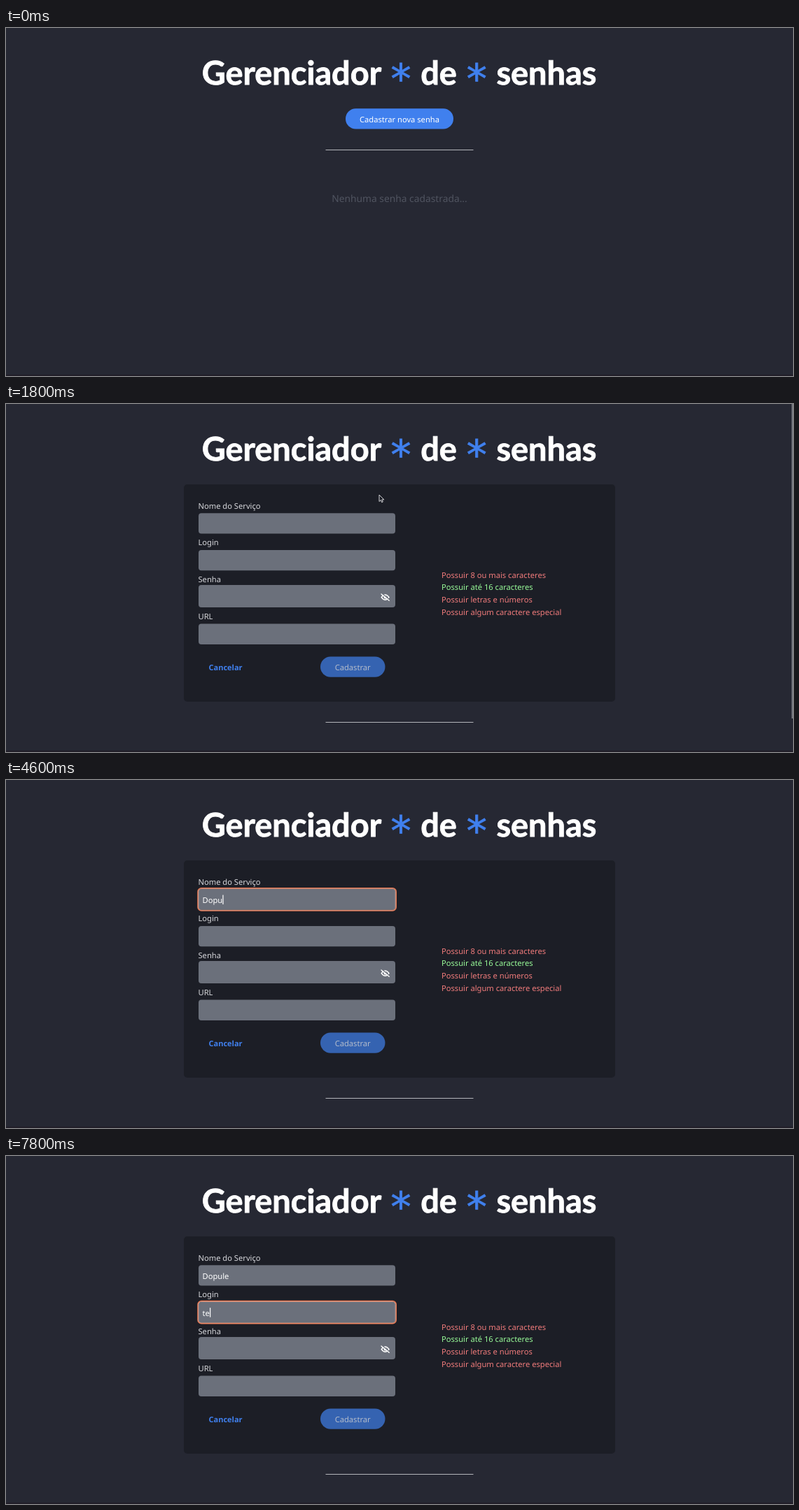
Write an HTML page that moves like this. It is 1124x498 px and loops after 8000 ms.

```html
<!DOCTYPE html>
<html lang="pt-BR">
<head>
<meta charset="utf-8">
<title>Gerenciador de senhas</title>
<style>
  html, body { margin: 0; width: 100%; height: 100%; overflow: hidden; background: #262833; }
  svg { display: block; width: 1124px; height: 498px; }
  text { font: 11.17px "Noto Sans", "Open Sans", sans-serif; fill: #d6d7db; text-rendering: geometricPrecision; white-space: pre; }
  .title text { font: 700 46.9px Lato, sans-serif; fill: #fff; stroke: #fff; stroke-width: .9; }
  .title .star { font: 400 58px "DejaVu Sans", sans-serif; fill: #4080ee; stroke: #4080ee; text-anchor: middle; }
  .mid { text-anchor: middle; }
  .field { fill: #6b707b; }
  .bad text { fill: #f07b7b; }
  .bad .ok { fill: #98fb98; }
  .typed { fill: #fff; }
</style>
</head>
<body>
<svg viewBox="0 0 1124 498">
  <rect width="1124" height="498" fill="#262833"/>
  <rect y="496" width="1124" height="2" fill="#211f29"/>
  <g class="title">
    <text x="279.7" y="80.5">Gerenciador</text>
    <text class="star" x="564" y="93.2">*</text>
    <text x="592.2" y="80.5">de</text>
    <text class="star" x="672.3" y="93.2">*</text>
    <text x="700.4" y="80.5">senhas</text>
  </g>

  <g id="home">
    <rect id="add" x="485" y="115.3" width="154" height="29.2" rx="14.6"/>
    <text class="mid" x="562" y="134.8" style="fill:#fff">Cadastrar nova senha</text>
    <text class="mid" x="562" y="248.7" style="font-size:13.8px;fill:#505460">Nenhuma senha cadastrada...</text>
  </g>

  <g id="form">
    <rect x="254" y="115" width="616" height="311" rx="5" fill="#1c1e26"/>
    <text x="274.5" y="149.5">Nome do Serviço</text>
    <text x="274.5" y="202">Login</text>
    <text x="274.5" y="255">Senha</text>
    <text x="274.5" y="307.6">URL</text>
    <rect class="field" x="275" y="156.3" width="281" height="29.3" rx="4"/>
    <rect class="field" x="275" y="209" width="281" height="29.3" rx="4"/>
    <rect class="field" x="275" y="259" width="281" height="32" rx="4"/>
    <rect class="field" x="275" y="314.6" width="281" height="29.3" rx="4"/>
    <g fill="none" stroke="#fff">
      <path d="M536.2 276.6Q541.6 269.4 547 276.6Q541.6 283.8 536.2 276.6Z" stroke-width="1.5"/>
      <circle cx="541.6" cy="276.6" r="1.3" stroke-width="1.5"/>
      <path d="M537 271.2L548 280.2" stroke="#6b707b" stroke-width="1.2"/>
      <path d="M536 272L547.2 281.3" stroke-width="1.4" stroke-linecap="round"/>
    </g>
    <text x="289.5" y="380.7" style="font-weight:700;font-size:11px;fill:#4080ee">Cancelar</text>
    <rect x="449" y="361.4" width="92.5" height="29.3" rx="14.6" fill="#3563b1"/>
    <text class="mid" x="495.2" y="380.7" style="fill:#b3bccb">Cadastrar</text>
    <g class="bad">
      <text x="622" y="248.8">Possuir 8 ou mais caracteres</text>
      <text class="ok" x="622" y="266.4">Possuir até 16 caracteres</text>
      <text x="622" y="284">Possuir letras e números</text>
      <text x="622" y="301.6">Possuir algum caractere especial</text>
    </g>
    <g id="ring" fill="none">
      <rect x="274" y="154.8" width="283.2" height="32.2" rx="5" stroke="#ec7a54" stroke-width="1.5"/>
      <rect x="274.9" y="155.8" width="281.3" height="30.3" rx="4.2" stroke="#f5c8b8" stroke-width=".7"/>
    </g>
    <text id="service" class="typed" x="280.5" y="175.8"></text>
    <text id="login" class="typed" x="280.5" y="228.5"></text>
    <rect id="caret" y="164.5" width="1.2" height="13.5" fill="#fff"/>
    <rect id="bar" x="1122" width="2" height="450" fill="#74767e"/>
  </g>

  <rect id="line" x="456.5" width="211" height="1" fill="#b4b5ba"/>

  <g id="arrow"><path d="M.3 .5V10L2.6 8L4 11.2L5.6 10.5L4.2 7.4H7.2Z" fill="#1c1e26" stroke="#e6e6e8" stroke-width=".9"/></g>
  <g id="hand"><path d="M1.3 0Q2.6 -.4 2.8 1V3.6L6.4 4.3Q7.6 4.6 7.4 6L6.6 9.4H2.4L-.8 6.2Q-1 5 .4 5.2L1 5.6V.8Z" fill="#fff" stroke="#23252e" stroke-width=".8"/></g>
  <g id="beam" fill="none">
    <path d="M-2 -5H2M0 -5V5M-2 5H2" stroke="#e4e4e6" stroke-width="2.2"/>
    <path d="M-2 -5H2M0 -5V5M-2 5H2" stroke="#30323a" stroke-width=".8"/>
  </g>
</svg>
<script>
const LOOP = 8000;
const $ = id => document.getElementById(id);
const show = (id, on) => $(id).setAttribute("display", on ? "inline" : "none");
const mix = (a, b, k) => a + (b - a) * k;
const clamp = k => Math.min(1, Math.max(0, k));
// number of key times already reached
const typedCount = (t, times) => times.filter(k => t >= k).length;

function pointer(t) {
  if (t < 600 || t >= 4000) return null;
  const down = 1 - (1 - clamp((t - 600) / 600)) ** 2;
  const across = clamp((t - 2200) / 600);
  const x = mix(mix(546, 532.7, down), 464.5, across);
  const y = mix(mix(27, 129.5, down), 172, across);
  const kind = t < 1800 ? (y > 115 ? "hand" : "arrow") : (y > 156 ? "beam" : "arrow");
  return { x, y, kind };
}

function draw(ms) {
  const t = Math.floor(ms % LOOP / 100) * 100;
  const open = t >= 1800;
  show("home", !open);
  show("form", open);
  $("line").setAttribute("y", open ? 455 : 174);

  const hover = clamp((t - 900) / 300);
  $("add").setAttribute("fill", `rgb(${mix(64, 60, hover)},${mix(128, 117, hover)},${mix(238, 217, hover)})`);
  $("bar").setAttribute("opacity", clamp((4400 - t) / 500));

  const second = t >= 6200;
  const shift = `translate(0 ${second ? 52.7 : 0})`;
  $("service").textContent = "Dopule".slice(0, typedCount(t, [4000, 4300, 4600, 4600, 4800, 4900]));
  $("login").textContent = "te".slice(0, typedCount(t, [7500, 7800]));
  show("ring", t >= 3000);
  $("ring").setAttribute("transform", shift);

  show("caret", t >= 3000 && !(t >= 5500 && t < 6200));
  const active = $(second ? "login" : "service");
  const width = open && active.textContent ? active.getComputedTextLength() : 0;
  $("caret").setAttribute("x", 280.7 + width);
  $("caret").setAttribute("transform", shift);

  const p = pointer(t);
  for (const id of ["arrow", "hand", "beam"]) {
    show(id, p && p.kind === id);
    if (p) $(id).setAttribute("transform", `translate(${p.x} ${p.y})`);
  }
}

const start = performance.now();
function tick() {
  draw(performance.now() - start);
  requestAnimationFrame(tick);
}
tick();
</script>
</body>
</html>
```
